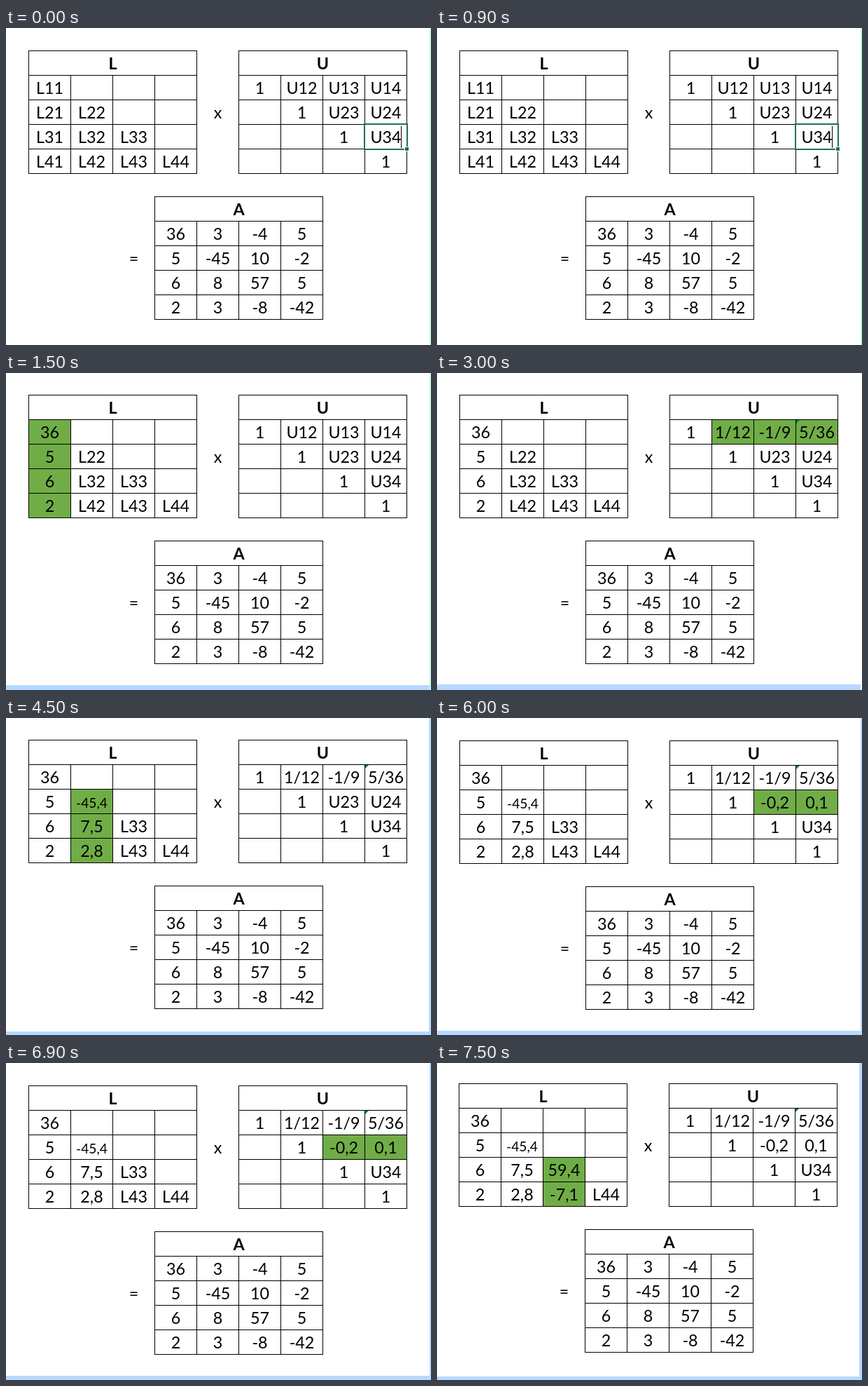
Recreate the animation shown at these times as an HTML page. Size 607 px wide and 452 px high, loop 8000 ms.

```html
<!DOCTYPE html>
<html lang="en">
<head>
<meta charset="utf-8">
<title>LU decomposition</title>
<style>
  html, body { margin: 0; width: 100%; height: 100%; overflow: hidden; background: #fff; }
  svg { display: block; width: 607px; height: 452px; }
  text { font: 23.3px Lato, Calibri, sans-serif; font-kerning: none; text-anchor: middle; }
  .head { font-weight: 700; }
  .small { font-size: 19.2px; }
</style>
</head>
<body>
<svg id="stage" viewBox="0 0 607 452"></svg>
<script>
const NS = "http://www.w3.org/2000/svg";
const COL = 60, ROW = 35, LOOP = 8000;
const GREEN = "#70ad47", EDIT = "#217346", BLUE = "#b5d9ff", MINT = "#bdfae2";
const stage = document.getElementById("stage");

// Each step overwrites and highlights the cells in `set`; x, y move the sheet.
const steps = [
  { at: 0, x: 32, y: 32, set: {}, edge: [605, MINT], editing: true },
  { at: 1500, x: 32, y: 31, set: { L11: "36", L21: "5", L31: "6", L41: "2" }, edge: [605, MINT], bar: 445 },
  { at: 3000, x: 32, y: 31, set: { U12: "1/12", U13: "-1/9", U14: "5/36" }, bar: 444, flag: true },
  { at: 4500, x: 32, y: 31, set: { L22: "-45,4", L32: "7,5", L42: "2,8" }, edge: [604, BLUE], bar: 447, flag: true },
  { at: 6000, x: 32, y: 32, set: { U23: "-0,2", U24: "0,1" }, edge: [605, BLUE], bar: 446, flag: true },
  { at: 7500, x: 31, y: 29, set: { L33: "59,4", L43: "-7,1" }, edge: [603, BLUE], bar: 447, flag: true }
];

const A = [[36, 3, -4, 5], [5, -45, 10, -2], [6, 8, 57, 5], [2, 3, -8, -42]];
const values = {};
for (let r = 1; r <= 4; r++) {
  for (let c = 1; c <= 4; c++) {
    values[`A${r}${c}`] = String(A[r - 1][c - 1]);
    values[`L${r}${c}`] = c <= r ? `L${r}${c}` : "";
    values[`U${r}${c}`] = c > r ? `U${r}${c}` : c === r ? "1" : "";
  }
}

function add(parent, tag, attrs, content) {
  const el = document.createElementNS(NS, tag);
  for (const key in attrs) el.setAttribute(key, attrs[key]);
  if (content) el.textContent = content;
  parent.append(el);
  return el;
}

const rect = (parent, x, y, width, height, fill) =>
  add(parent, "rect", { x, y, width, height, fill, "shape-rendering": "crispEdges" });

const label = (parent, x, y, content, cls = "") =>
  add(parent, "text", { x, y, class: cls }, content);

function drawTable(parent, name, left, top, marked) {
  for (let r = 1; r <= 4; r++) {
    for (let c = 1; c <= 4; c++) {
      const key = `${name}${r}${c}`, x = left + (c - 1) * COL, y = top + r * ROW;
      if (key in marked) rect(parent, x, y, COL, ROW, GREEN);
      if (values[key]) label(parent, x + 30.5, y + 27, values[key], values[key].length > 4 ? "small" : "");
    }
  }
  label(parent, left + 30.5 + 1.5 * COL, top + 27, name, "head");
  for (let i = 0; i <= 5; i++) rect(parent, left, top + i * ROW, 4 * COL + 1, 1, "#000");
  for (let i = 0; i <= 4; i++) {
    const y = i % 4 ? top + ROW : top;
    rect(parent, left + i * COL, y, 1, top + 5 * ROW + 1 - y, "#000");
  }
}

function drawEditor(parent, x, y) {
  add(parent, "rect", { x, y, width: COL + 1, height: ROW + 1, fill: "none", stroke: EDIT, "stroke-width": 2, "shape-rendering": "crispEdges" });
  rect(parent, x + COL - 3, y + ROW - 3, 7, 7, "#fff");
  rect(parent, x + COL - 2, y + ROW - 2, 5, 5, EDIT);
  rect(parent, x + 52, y + 3, 1, 31, "#000");
}

function drawStep(step) {
  Object.assign(values, step.set);
  const scene = add(stage, "g", { visibility: "hidden" });
  if (step.edge) rect(scene, step.edge[0], 0, 607 - step.edge[0], 452, step.edge[1]);
  if (step.bar) rect(scene, 0, step.bar, 605, 452 - step.bar, BLUE);
  const sheet = add(scene, "g", { transform: `translate(${step.x} ${step.y})` });
  drawTable(sheet, "L", 0, 0, step.set);
  drawTable(sheet, "U", 300, 0, step.set);
  drawTable(sheet, "A", 180, 208, step.set);
  label(sheet, 270.5, 97, "x");
  label(sheet, 150.5, 305, "=");
  if (step.flag) add(sheet, "path", { d: "M481 36h5l-5 5z", fill: "#107c41" });
  if (step.editing) drawEditor(sheet, 480, 105);
  return scene;
}

const scenes = steps.map(drawStep);
let shown = -1;

function tick() {
  const time = performance.now() % LOOP;
  const current = steps.filter(step => step.at <= time).length - 1;
  if (current !== shown) {
    scenes.forEach((scene, i) => scene.setAttribute("visibility", i === current ? "visible" : "hidden"));
    shown = current;
  }
  requestAnimationFrame(tick);
}
tick();
</script>
</body>
</html>
```
